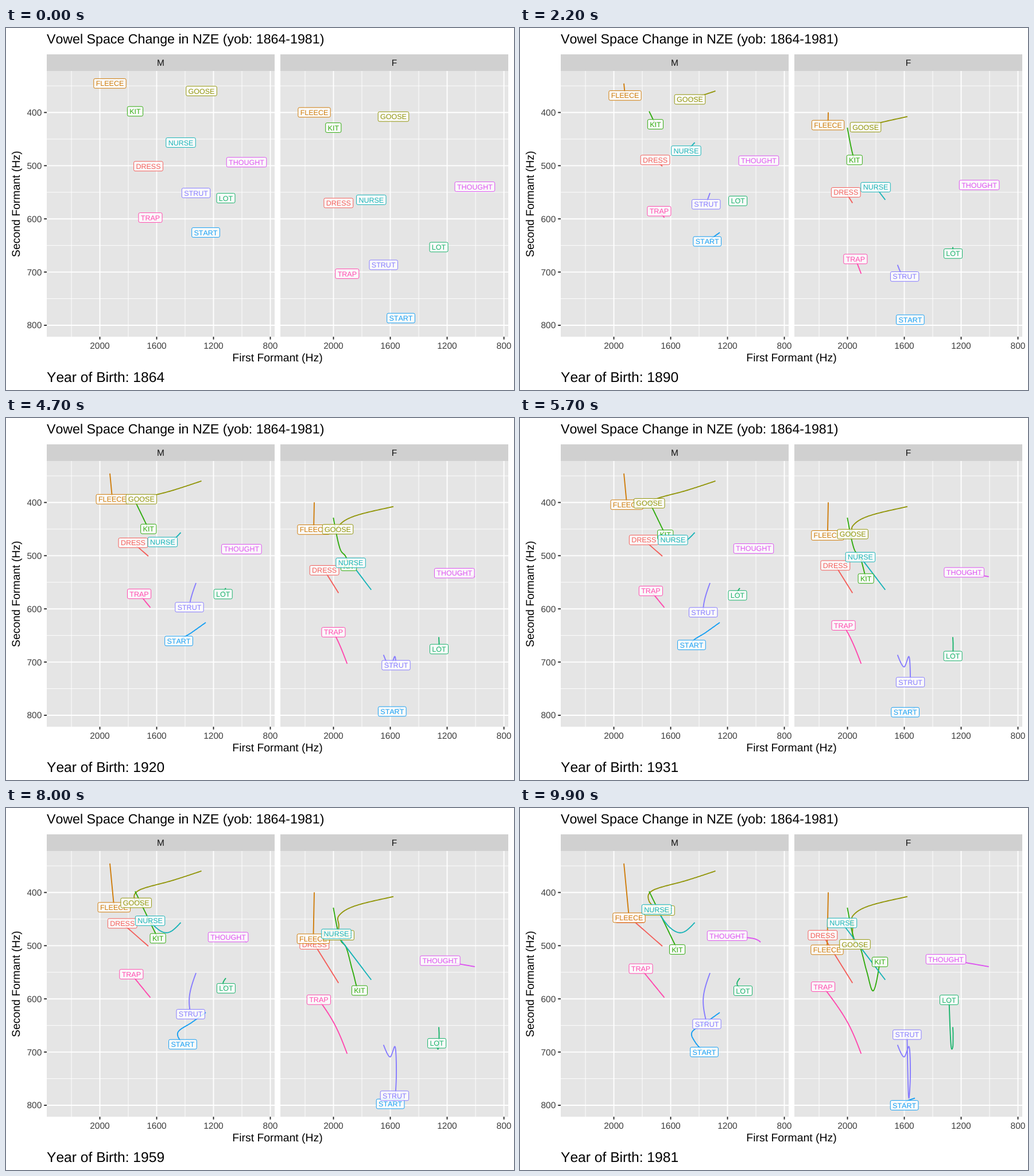
Animation of 885x632 px, one loop 10 s. Source, as an HTML page:

```html
<!DOCTYPE html>
<html lang="en">
<head>
<meta charset="utf-8">
<title>Vowel Space Change</title>
<style>
  html, body { margin: 0; width: 100%; height: 100%; overflow: hidden; background: #fff; }
  svg { display: block; }
  text {
    font-family: "Liberation Sans", Arial, Helvetica, sans-serif;
    font-kerning: none;
    text-rendering: geometricPrecision;
  }
</style>
</head>
<body>
<svg id="plot" width="885" height="632" viewBox="0 0 885 632"></svg>
<script>
const FRAMES = 100, STEP = 100;
const FIRST_YEAR = 1864, LAST_YEAR = 1981;
const TOP = 75, BOTTOM = 539, WIDTH = 397;
const TICK = "#272727", AXIS_TEXT = "#3D3D3D";
const svg = document.getElementById("plot");

// Key points of each path, evenly spaced in time; two points make a straight glide
const vowels = [
  { name: "DRESS", color: "#F35E5A",
    M: [[248, 241.3], [192, 192]],
    F: [[579.3, 305.5], [527.3, 222]] },
  { name: "FLEECE", color: "#CF7C0A",
    M: [[181, 96.8], [190, 191.5]],
    F: [[537, 147.3], [535, 247.5]] },
  { name: "GOOSE", color: "#92960B",
    M: [[340.5, 110], [290, 126.5], [232, 143.5], [224.5, 161.5], [242.5, 179]],
    F: [[675, 154.7], [607, 171.3], [580, 188], [579.8, 204.7], [579.5, 221.5], [583.5, 238]] },
  { name: "KIT", color: "#30AB0E",
    M: [[225, 145.5], [274, 247]],
    F: [[570.3, 174], [581.5, 227], [593, 244.5], [604, 285], [615.5, 319], [627, 268.7]] },
  { name: "LOT", color: "#18B36B",
    M: [[383, 297], [378.3, 308], [388.5, 319]],
    F: [[754, 382.5], [754.5, 393.3], [754.5, 395.8], [754, 417], [750.7, 412.5], [747.5, 335]] },
  { name: "NURSE", color: "#17B3B7",
    M: [[304.5, 200], [282, 217.5], [260.5, 208], [238, 177]],
    F: [[636.3, 300], [561, 200.7]] },
  { name: "START", color: "#169FF3",
    M: [[348, 357], [323.5, 374.5], [299.8, 391], [305, 408.5], [321, 426]],
    F: [[688, 506.5], [672.3, 512.7], [669.6, 519]] },
  { name: "STRUT", color: "#867BFF",
    M: [[331, 288], [319.3, 332.5], [325.5, 377]],
    F: [[657.7, 413.5], [669, 434.5], [678, 417.3], [680, 467], [677, 504], [674.3, 395.7]] },
  { name: "THOUGHT", color: "#DD53F0",
    M: [[419, 234.3], [413.5, 230.3], [401.5, 227], [361, 223]],
    F: [[816.7, 277], [742, 264]] },
  { name: "TRAP", color: "#FF48AE",
    M: [[251.5, 331], [210.5, 280.5]],
    F: [[594.3, 429], [568.8, 371], [528, 312]] }
];

function add(parent, tag, attrs, content) {
  const node = document.createElementNS("http://www.w3.org/2000/svg", tag);
  for (const key in attrs) node.setAttribute(key, attrs[key]);
  if (content !== undefined) node.textContent = content;
  parent.appendChild(node);
  return node;
}
const rect = (x, y, width, height, fill) => add(svg, "rect", { x, y, width, height, fill });
const line = (x1, y1, x2, y2, stroke, width) =>
  add(svg, "line", { x1, y1, x2, y2, stroke, "stroke-width": width });
const label = (x, y, size, content, anchor = "start", fill = "#000") =>
  add(svg, "text", { x, y, "font-size": size, "text-anchor": anchor, fill }, content);

// Smooth curve through evenly spaced values, at progress p from 0 to 1
function curve(v, p) {
  const last = v.length - 1;
  const i = Math.min(Math.floor(p * last), last - 1);
  const inner = k => (v[k + 1] - v[k - 1]) / 2;
  const slope = k => {
    if (last === 1) return v[1] - v[0];
    if (k === 0) return 1.5 * (v[1] - v[0]) - 0.5 * inner(1);
    if (k === last) return 1.5 * (v[last] - v[last - 1]) - 0.5 * inner(last - 1);
    return inner(k);
  };
  const s = p * last - i, r = 1 - s;
  return v[i] * (1 + 2 * s) * r * r + slope(i) * s * r * r
    + v[i + 1] * s * s * (3 - 2 * s) - slope(i + 1) * s * s * r;
}

const rowY = hz => 147.5 + (hz - 400) * 0.9287;

function drawPanel(left, name) {
  const right = left + WIDTH;
  const colX = hz => left + 92.5 + (2000 - hz) * 0.2475;
  rect(left, 46, WIDTH, 29, "#D0D0D0");
  rect(left, TOP, WIDTH, BOTTOM - TOP, "#E5E5E5");
  label(left + WIDTH / 2, 66, 15.5, name, "middle", "#121212");
  for (let hz = 350; hz <= 750; hz += 100) line(left, rowY(hz), right, rowY(hz), "#fff", 0.94);
  for (let hz = 2200; hz >= 1000; hz -= 400) line(colX(hz), TOP, colX(hz), BOTTOM, "#fff", 0.94);
  for (let hz = 400; hz <= 800; hz += 100) line(left, rowY(hz), right, rowY(hz), "#fff", 1.88);
  for (let hz = 2000; hz >= 800; hz -= 400) {
    const x = colX(hz);
    line(x, TOP, x, BOTTOM, "#fff", 1.88);
    line(x, BOTTOM, x, BOTTOM + 4.8, TICK, 1.88);
    label(x, 559.7, 15.5, hz, "middle", AXIS_TEXT);
  }
}

function drawTracks(panel) {
  const trails = add(svg, "g", { fill: "none", "stroke-width": 1.88 });
  const tags = add(svg, "g", {});
  return vowels.map(({ name, color, [panel]: path }) => {
    const trail = add(trails, "polyline", { stroke: color });
    const tag = add(tags, "g", {});
    const box = add(tag, "rect", {
      y: -8.4, height: 16.8, rx: 2.4, fill: "#fff", "fill-opacity": 0.8, stroke: color
    });
    const text = add(tag, "text", { y: 4.5, "font-size": 12.5, "text-anchor": "middle", fill: color }, name);
    const width = text.getComputedTextLength() + 7.7;
    box.setAttribute("x", -width / 2);
    box.setAttribute("width", width);
    const axes = [0, 1].map(axis => path.map(point => point[axis]));
    const points = Array.from({ length: FRAMES }, (_, f) =>
      axes.map(values => curve(values, f / (FRAMES - 1)).toFixed(2)).join());
    return { trail, tag, points };
  });
}

rect(0, 0, 885, 632, "#fff");
drawPanel(71, "M");
drawPanel(478, "F");
for (let hz = 400; hz <= 800; hz += 100) {
  line(66.2, rowY(hz), 71, rowY(hz), TICK, 1.88);
  label(62.3, rowY(hz) + 5.5, 15.5, hz, "end", AXIS_TEXT);
}
label(71, 27.3, 23.2, "Vowel Space Change in NZE (yob: 1864-1981)");
label(473, 581.5, 19.4, "First Formant (Hz)", "middle");
label(0, 0, 19.4, "Second Formant (Hz)", "middle").setAttribute("transform", "translate(24 307.3) rotate(-90)");
const yearText = label(71, 617.5, 24.6, "");
const tracks = [...drawTracks("M"), ...drawTracks("F")];

let shown = -1;
function show(frame) {
  if (frame === shown) return;
  shown = frame;
  const year = FIRST_YEAR + Math.round((LAST_YEAR - FIRST_YEAR) * frame / (FRAMES - 1));
  yearText.textContent = "Year of Birth: " + year;
  for (const { trail, tag, points } of tracks) {
    trail.setAttribute("points", points.slice(0, frame + 1).join(" "));
    tag.setAttribute("transform", `translate(${points[frame]})`);
  }
}

const start = performance.now();
function tick() {
  show(Math.floor((performance.now() - start) / STEP) % FRAMES);
  requestAnimationFrame(tick);
}
show(0);
requestAnimationFrame(tick);
</script>
</body>
</html>
```
